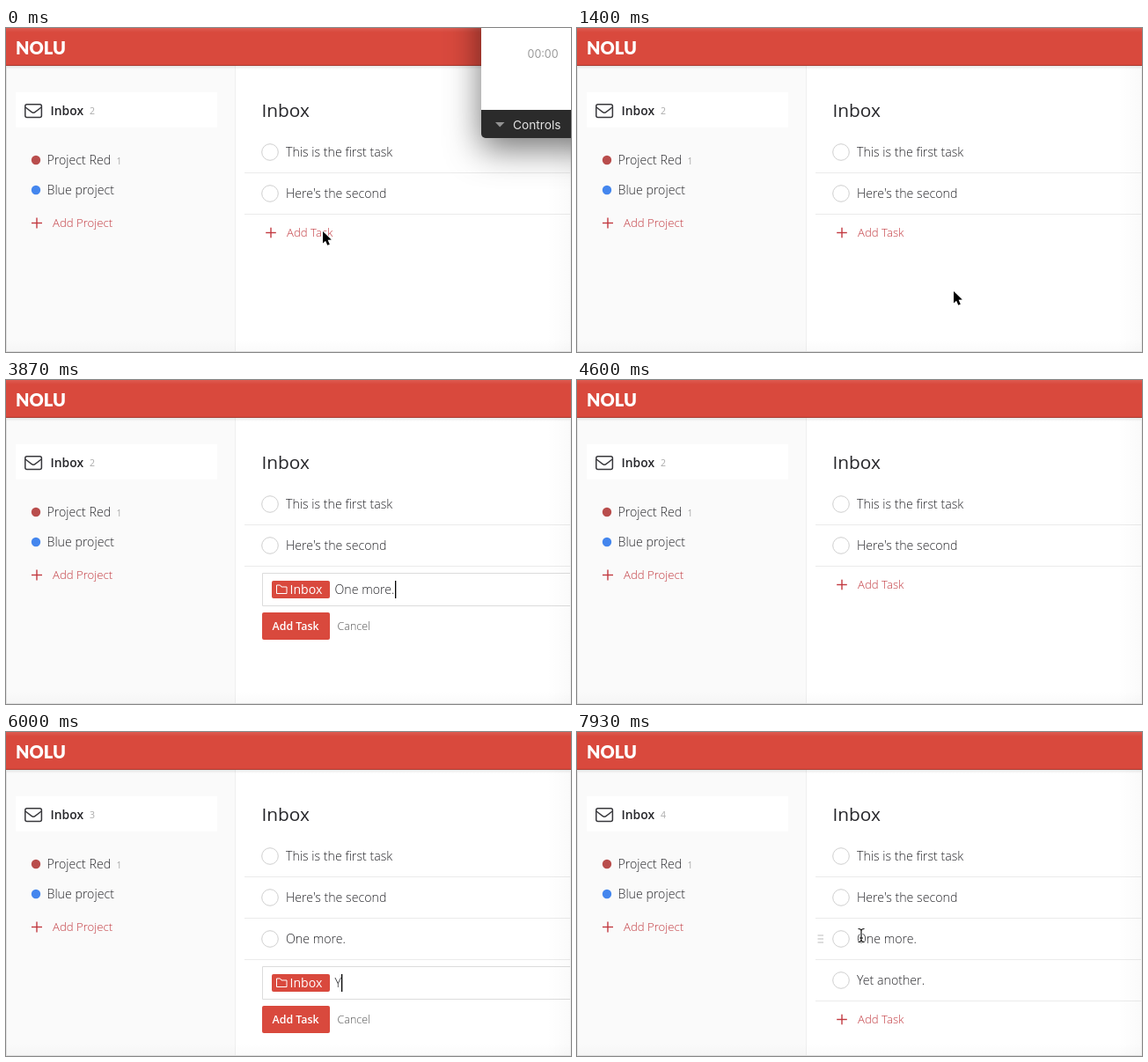
An HTML page with a canvas for the animation above (8000 ms loop, 642x368 px).

```html
<!DOCTYPE html>
<html lang="en">
<head>
<meta charset="utf-8">
<title>Task list</title>
<style>
html, body { margin: 0; width: 100%; height: 100%; overflow: hidden; background: #fff; }
canvas { display: block; }
</style>
</head>
<body>
<canvas id="stage" width="642" height="368"></canvas>
<script>
const W = 642, H = 368, LOOP = 8000, STEP = 1000 / 15;
const RED = '#d9493d', LINK = '#c23a40', INK = '#26262a';
const SANS = '"Open Sans", "Noto Sans", sans-serif';
const BODY = `300 14.2px ${SANS}`;
const SMALL = `300 13.2px ${SANS}`;
const ROW = 47;
const ctx = document.getElementById('stage').getContext('2d');

// Key times in ms
const OPEN1 = 2400, SEND1 = 4580, LIST1 = 4930;
const OPEN2 = 5580, SEND2 = 7180, LIST2 = 7440;

const ease = p => p * p * (3 - 2 * p);
const ramp = (t, a, b) => Math.min(1, Math.max(0, (t - a) / (b - a)));

function text(str, x, y, font, color) {
  ctx.font = font;
  ctx.fillStyle = color;
  ctx.fillText(str, x, y);
}

function rect(x, y, w, h, color) {
  ctx.fillStyle = color;
  ctx.fillRect(x, y, w, h);
}

function round(x, y, w, h, r, color) {
  ctx.beginPath();
  ctx.roundRect(x, y, w, h, r);
  ctx.fillStyle = color;
  ctx.fill();
}

function disc(x, y, r, color) {
  ctx.beginPath();
  ctx.arc(x, y, r, 0, 7);
  ctx.fillStyle = color;
  ctx.fill();
}

function path(points, closed) {
  ctx.beginPath();
  points.forEach(([x, y]) => ctx.lineTo(x, y));
  if (closed) ctx.closePath();
}

function stroke(color, width) {
  ctx.strokeStyle = color;
  ctx.lineWidth = width;
  ctx.stroke();
}

function plus(x, y, r) {
  rect(x - r, y - 0.7, 2 * r, 1.4, LINK);
  rect(x - 0.7, y - r, 1.4, 2 * r, LINK);
}

function fade(x0, y0, x1, y1, from, to) {
  const g = ctx.createLinearGradient(x0, y0, x1, y1);
  g.addColorStop(0, from);
  g.addColorStop(1, to);
  return g;
}

function drawHeader() {
  rect(0, 0, W, 42, RED);
  rect(0, 0, W, 5, fade(0, 0, 0, 5, 'rgba(255,255,255,.10)', 'rgba(255,255,255,0)'));
  rect(0, 42, W, 1, '#a93a30');
  rect(0, 43, W, 4, fade(0, 43, 0, 47, 'rgba(0,0,0,.09)', 'rgba(0,0,0,0)'));
  text('NOLU', 11, 30, '900 20px Lato, "Open Sans", sans-serif', '#fff');
}

function drawEnvelope() {
  ctx.beginPath();
  ctx.roundRect(21.8, 86.8, 18.6, 14.8, 2);
  stroke('#38383c', 1.5);
  ctx.beginPath();
  ctx.moveTo(22, 90);
  ctx.lineTo(29, 95.4);
  ctx.quadraticCurveTo(31.1, 97, 33.2, 95.4);
  ctx.lineTo(40.2, 90);
  stroke('#38383c', 1.4);
}

function drawSidebar(count) {
  rect(0, 43, 260, H - 43, '#fafafa');
  rect(260, 43, 1, H - 43, '#efefef');
  rect(11, 73, 229, 40, '#fff');
  drawEnvelope();
  text('Inbox', 50.5, 99, `600 13.9px ${SANS}`, INK);
  text(count, 95, 98, `400 10.5px ${SANS}`, '#aaa');
  disc(34, 150, 5.2, '#b94d4c');
  text('Project Red', 46.5, 155, BODY, INK);
  text('1', 125.5, 155, `400 10.5px ${SANS}`, '#aaa');
  disc(34, 184, 5.2, '#4486ee');
  text('Blue project', 46.5, 189, BODY, INK);
  plus(35, 221.5, 6);
  text('Add Project', 53, 226, SMALL, LINK);
}

function drawTask(label, i) {
  const y = 141 + i * ROW;
  ctx.beginPath();
  ctx.arc(300, y, 9.3, 0, 7);
  stroke('#cfcfcf', 1);
  text(label, 318, y + 5, BODY, INK);
  rect(271, y + 23, W - 271, 1, '#ebebeb');
}

function drawAddLink(rows) {
  const y = 138 + rows * ROW;
  plus(301, y + 0.5, 5.8);
  text('Add Task', 319, y + 5, SMALL, LINK);
}

function drawFolder(x, y) {
  path([[x, y], [x + 4, y], [x + 5.5, y + 2], [x + 11.5, y + 2],
        [x + 11.5, y + 9.5], [x, y + 9.5]], true);
  stroke('#fff', 1);
}

function drawForm(rows, typed) {
  const y = 125 + rows * ROW;
  ctx.beginPath();
  ctx.rect(291.5, y + 0.5, 400, 37);
  ctx.fillStyle = '#fff';
  ctx.fill();
  stroke('#dcdcdc', 1);
  round(302, y + 9, 66, 20, 2, RED);
  drawFolder(307.5, y + 14);
  text('Inbox', 322.5, y + 24, `400 14.1px ${SANS}`, '#fff');
  text(typed, 373.5, y + 24, BODY, INK);
  rect(374 + Math.round(ctx.measureText(typed).width), y + 9, 1.3, 20, '#000');
  round(291, y + 45, 77, 31, 2, RED);
  text('Add Task', 302.5, y + 65, `600 12.4px ${SANS}`, '#fff');
  text('Cancel', 376.5, y + 65, `300 12.5px ${SANS}`, '#555');
}

function drawArrow(x, y) {
  path([[0, 0], [0, 13.5], [3.1, 10.7], [5.3, 15.8], [7.8, 14.7],
        [5.6, 9.8], [9.8, 9.6]].map(([a, b]) => [x + a, y + b]), true);
  ctx.lineJoin = 'round';
  stroke('#fff', 2);
  ctx.fillStyle = '#000';
  ctx.fill();
  ctx.lineJoin = 'miter';
}

function drawBeam(x, y) {
  ctx.beginPath();
  for (const s of [-1, 1]) {
    ctx.moveTo(x - 3.5, y + s * 7.5);
    ctx.quadraticCurveTo(x, y + s * 7.5, x, y + s * 5);
    ctx.quadraticCurveTo(x, y + s * 7.5, x + 3.5, y + s * 7.5);
  }
  ctx.moveTo(x, y - 5);
  ctx.lineTo(x, y + 5);
  ctx.moveTo(x - 2, y + 3);
  ctx.lineTo(x + 2, y + 3);
  stroke('#fff', 3);
  stroke('#111', 1.2);
}

function drawGrip(y) {
  for (const d of [-4, 0, 4]) rect(273.5, y + d - 0.5, 6.5, 1, '#bbb');
}

function drawRecorder(t) {
  const alpha = 1 - ramp(t, 60, 420);
  if (!alpha) return;
  ctx.save();
  ctx.globalAlpha = alpha;
  ctx.shadowColor = 'rgba(0,0,0,.55)';
  ctx.shadowBlur = 38;
  ctx.shadowOffsetY = 12;
  round(540, -60, 260, 185, 5, '#2b2b2b');
  ctx.shadowColor = 'transparent';
  rect(540, 0, 110, 93, '#fff');
  text('00:00', 592.5, 34, '400 12.5px Inter, Roboto, sans-serif', '#9a9a9a');
  path([[556, 107], [566.5, 107], [561.2, 112.5]], true);
  ctx.fillStyle = '#929292';
  ctx.fill();
  text('Controls', 576, 115, '400 13.7px Inter, Roboto, sans-serif', '#e4e4e4');
  ctx.restore();
}

function drawEdges() {
  rect(W - 28, 43, 28, H - 43, fade(W - 28, 0, W, 0, 'rgba(0,0,0,0)', 'rgba(0,0,0,.018)'));
  rect(0, H - 14, W, 14, fade(0, H - 14, 0, H, 'rgba(0,0,0,0)', 'rgba(0,0,0,.02)'));
  rect(0, 43, 1, H - 43, '#e2e2e2');
  rect(W - 1, 43, 1, H - 43, '#ececec');
  rect(0, H - 1, W, 1, '#dedede');
}

function drawCursor(t) {
  if (t < 2690) {
    const out = ease(ramp(t, 880, 1380));
    const back = ease(ramp(t, 1800, 2250));
    drawArrow(360 + 68 * out - 82 * back, 231 + 68 * out - 60 * back);
  } else if (t >= 7600) {
    const p = ease(ramp(t, 7600, 7900));
    drawBeam(335 - 12 * p, 240 - 9 * p);
  }
}

function typedAt(t, str, start, gap) {
  return str.slice(0, Math.max(0, Math.floor((t - start) / gap) + 1));
}

function draw(now) {
  const t = Math.floor(now % LOOP / STEP + 0.06) * STEP;
  const tasks = ['This is the first task', "Here's the second"];
  if (t >= LIST1) tasks.push('One more.');
  if (t >= LIST2) tasks.push('Yet another.');
  const rows = tasks.length;

  rect(0, 0, W, H, '#fff');
  drawSidebar(rows);
  drawHeader();
  text('Inbox', 290.5, 101, `400 20.8px ${SANS}`, INK);
  tasks.forEach(drawTask);

  if (t >= OPEN1 && t < SEND1) drawForm(rows, typedAt(t, 'One more.', 2950, 98));
  else if (t >= OPEN2 && t < SEND2) drawForm(rows, typedAt(t, 'Yet another. ', 5950, 72));
  else drawAddLink(rows);

  if (t >= 7600) drawGrip(235);
  drawEdges();
  drawRecorder(t);
  drawCursor(t);
}

function tick() {
  draw(performance.now());
  requestAnimationFrame(tick);
}
tick();
</script>
</body>
</html>
```
